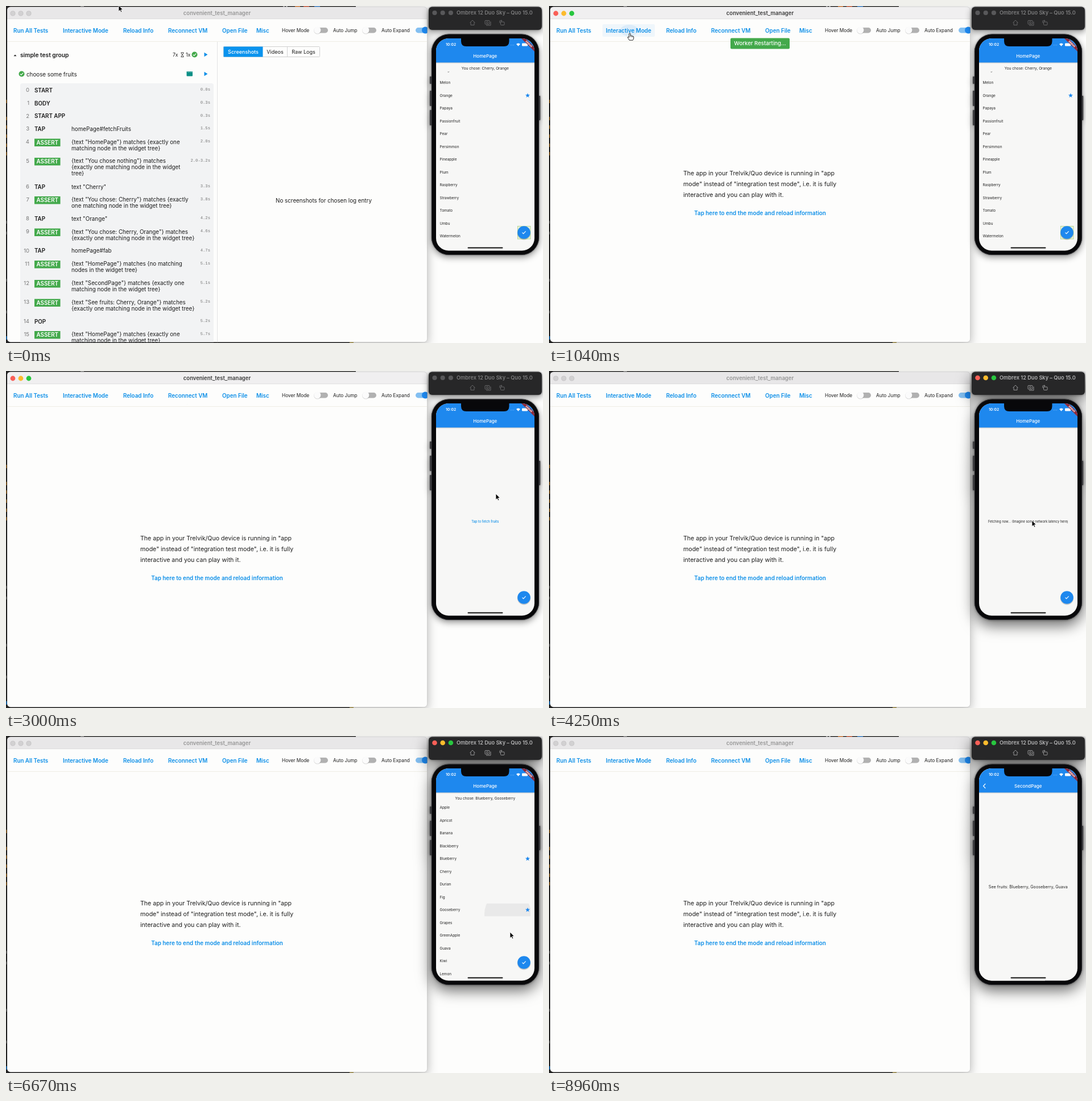
An HTML page for the animation above (9 s loop, 944 by 593 pixels).

```html
<!DOCTYPE html>
<html lang="en">
<head>
<meta charset="utf-8">
<title>convenient_test_manager</title>
<style>
html, body { margin: 0; width: 100%; height: 100%; overflow: hidden; background: #fdfdfc; }
svg { display: block; width: 944px; height: 593px; }
text { font-family: Inter, Roboto, sans-serif; white-space: pre; }
.mono { font-family: "Liberation Mono", "DejaVu Sans Mono", monospace; }
.off { display: none; }
#winFrame { filter: drop-shadow(0 5px 9px rgba(0,0,0,.3)); }
#simShape { filter: drop-shadow(0 0 1.5px rgba(0,0,0,.45)) drop-shadow(0 4px 6px rgba(0,0,0,.42)); }
#simShape.active { filter: drop-shadow(0 0 2px rgba(0,0,0,.5)) drop-shadow(0 9px 13px rgba(0,0,0,.6)); }
</style>
</head>
<body>
<svg id="stage" viewBox="0 0 944 593" xmlns="http://www.w3.org/2000/svg"></svg>
<script>
const BLUE = '#0c8fe8', APP = '#1e88ee', GREEN = '#43a94b', INK = '#1c1c1c', PAPER = '#fdfdfc', PAGE = '#f7f7f6';
const LOOP = 9000, ROW = 22.5;

const esc = s => s.replace(/&/g, '&amp;').replace(/</g, '&lt;');
const text = (x, y, s, size, fill = INK, weight = 400, anchor = 'start', extra = '') =>
  `<text x="${x}" y="${(y + size * .36).toFixed(2)}" font-size="${size}" fill="${fill}" font-weight="${weight}" text-anchor="${anchor}" ${extra}>${esc(s)}</text>`;
const rect = (x, y, w, h, fill, r = 0, extra = '') =>
  `<rect x="${x}" y="${y}" width="${w}" height="${h}" rx="${r}" fill="${fill}" ${extra}/>`;
const dot = (x, y, r, fill, extra = '') => `<circle cx="${x}" cy="${y}" r="${r}" fill="${fill}" ${extra}/>`;
const path = (d, fill = 'none', extra = '') => `<path d="${d}" fill="${fill}" ${extra}/>`;
const group = (id, body, extra = '') => `<g id="${id}" ${extra}>${body}</g>`;
const line = (color, w = 1) => `stroke="${color}" stroke-width="${w}"`;
const check = (x, y, k, color, w) =>
  path(`M${x - 2.6 * k} ${y + .1 * k}L${x - .8 * k} ${y + 1.9 * k}L${x + 2.7 * k} ${y - 1.8 * k}`, 'none', line(color, w));
const passed = (x, y) => dot(x, y, 5, GREEN) + check(x, y, 1, '#fff', 1.2);
const play = (x, y) => path(`M${x - 2.5} ${y - 3.7}V${y + 3.7}L${x + 3.4} ${y}Z`, BLUE);

function lights(x, y, gap, r, colors, edge = 'none') {
  return colors.map((c, i) => dot(x + i * gap, y, r, c, line(edge, .6))).join('');
}

function star(x, y) {
  let d = '';
  for (let i = 0; i < 10; i++) {
    const a = -Math.PI / 2 + i * Math.PI / 5, r = i % 2 ? 1.8 : 4.3;
    d += `${i ? 'L' : 'M'}${(x + r * Math.cos(a)).toFixed(2)} ${(y + r * Math.sin(a)).toFixed(2)}`;
  }
  return path(d + 'Z', APP);
}

// Desktop behind the windows
function desktop() {
  let s = rect(0, 0, 944, 593, PAPER) + rect(0, 0, 615, 8, '#262626') +
    rect(0, 0, 12, 593, '#262626') + rect(0, 585, 606, 8, '#262626');
  for (const y of [168, 198, 213, 229, 245, 260]) s += rect(0, y - 3, 1.5, 6, '#a8742a');
  for (const y of [380, 399, 482, 538]) s += rect(0, y - 2, 1.5, 5, '#666');
  s += rect(0, 581, 2, 6, '#1d6fb5') + rect(131, 0, 6, 1, '#999') + rect(604, 591, 7, 2, '#b9a24c');
  const bits = [[487, 3, '#aaa'], [492, 3, '#aaa'], [508, 9, '#e07a2c'], [523, 10, '#d8502c'], [542, 10, '#3182d8']]
    .map(([x, w, c]) => rect(x, 0, w, 2.5, c)).join('');
  return s + group('topBits', bits);
}

const toggle = x => rect(x, 38, 24, 9.5, '#b1b1b1', 4.7) +
  dot(x + 5.5, 43.2, 6.4, '#00000022') + dot(x + 5.5, 42.5, 6, '#fbfbfb');

function toolbar() {
  const links = [[13, 'Run All Tests'], [100, 'Interactive Mode'], [206, 'Reload Info'], [285, 'Reconnect VM'], [380, 'Open File'], [440, 'Misc']];
  const labels = [[485, 'Hover Mode'], [575, 'Auto Jump'], [660, 'Auto Expand']];
  return group('hover', rect(94, 32, 92, 22, '#eff6fb', 2) + `<ellipse id="press" cx="141" cy="43" rx="14" ry="10" fill="#dcecf9"/>`) +
    links.map(([x, s]) => text(x, 43, s, 9.8, BLUE, 600)).join('') +
    labels.map(([x, s]) => text(x, 43, s, 8.3)).join('') +
    toggle(542) + toggle(627) + rect(720, 38, 24, 9.5, '#83bff1', 4.7) + dot(737, 42.5, 6, APP) +
    rect(2, 62, 738, 1, '#efeee6');
}

const one = '{exactly one';
const LOG = [
  [148, 'START', '', '0.0s'], [171, 'BODY', '', '0.3s'], [193.5, 'START APP', '', '0.3s'],
  [216, 'TAP', 'homePage#fetchFruits', '1.5s'],
  [239, 'ASSERT', `{text "HomePage"} matches ${one}|matching node in the widget tree}`, '2.0s'],
  [272.5, 'ASSERT', `{text "You chose nothing"} matches|${one} matching node in the widget|tree}`, '2.0-3.2s'],
  [318, 'TAP', 'text "Cherry"', '3.3s'],
  [340.5, 'ASSERT', '{text "You chose: Cherry"} matches {exactly|one matching node in the widget tree}', '3.8s'],
  [374, 'TAP', 'text "Orange"', '4.2s'],
  [397, 'ASSERT', `{text "You chose: Cherry, Orange"} matches|${one} matching node in the widget tree}`, '4.6s'],
  [430.5, 'TAP', 'homePage#fab', '4.7s'],
  [453.5, 'ASSERT', '{text "HomePage"} matches {no matching|nodes in the widget tree}', '5.1s'],
  [487.5, 'ASSERT', `{text "SecondPage"} matches ${one}|matching node in the widget tree}`, '5.1s'],
  [521, 'ASSERT', `{text "See fruits: Cherry, Orange"} matches|${one} matching node in the widget tree}`, '5.2s'],
  [555, 'POP', '', '5.2s'],
  [577.5, 'ASSERT', `{text "HomePage"} matches ${one}|matching node in the widget tree}`, '5.7s']
];

function report() {
  let s = rect(371, 63, 1, 530, '#e4e4e4') + path('M13.5 88.3H18.5L16 85.4Z', '#222') +
    text(25, 86, 'simple test group', 10.2, INK, 600) +
    text(293, 86, '7x', 8.6) + text(316, 86, '1x', 8.6) +
    path('M307.5 82H312.5M307.5 89.6H312.5M308.3 82V83.8L311.7 87.8V89.6M311.7 82V83.8L308.3 87.8V89.6', 'none', line('#333', .9)) +
    passed(331.5, 85.5) + play(351, 85.5) +
    passed(27.5, 119.5) + text(36, 120, 'choose some fruits', 9.8) +
    rect(317.5, 115, 10.5, 8.5, '#0b8f86', 1) +
    path('M319.5 115L321 117M322.5 115L324 117M325.5 115L327 117', 'none', line('#fff', .7)) + play(351, 119.5) +
    rect(25, 136, 340, 470, '#f2f3f4', 4);
  LOG.forEach(([y, kind, body, time], i) => {
    s += text(41, y, String(i), 9.5, '#777', 400, 'end');
    s += kind === 'ASSERT'
      ? rect(50, y - 5.5, 45.5, 13.5, GREEN) + text(72.8, y + 1, kind, 9.8, '#fff', 600, 'middle')
      : text(50, y, kind, 9.8, INK, 600);
    if (body) body.split('|').forEach((l, k) => s += text(115, y + k * 11.2, l, 9.8));
    s += text(359, y - 1.3, time, 7.2, '#777', 400, 'end', 'class="mono"');
  });
  return s + rect(382.5, 71.5, 169, 18, PAPER, 1, line('#cfcfcf')) + rect(382.5, 71.5, 69, 18, '#0a93ee') +
    rect(494, 72, 1, 17, '#d4d4d4') + text(417, 81, 'Screenshots', 9, '#fff', 500, 'middle') +
    text(473, 81, 'Videos', 9, INK, 400, 'middle') + text(523, 81, 'Raw Logs', 9, INK, 400, 'middle') +
    text(558.5, 342, 'No screenshots for chosen log entry', 9.8, INK, 400, 'middle');
}

const appMode = () => ['The app in your Trelvik/Quo device is running in "app', 'mode" instead of "integration test mode", i.e. it is fully', 'interactive and you can play with it.']
  .map((s, i) => text(236, 294 + i * 19, s, 10.6)).join('') +
  text(371, 364, 'Tap here to end the mode and reload information', 9.9, BLUE, 600, 'middle');

function manager() {
  const title = (fill) => text(371, 12.5, 'convenient_test_manager', 9.5, fill, 600, 'middle');
  return rect(2, 1.5, 738.5, 590, PAPER, 6, 'id="winFrame"') +
    `<g clip-path="url(#winClip)">` + rect(2, 1.5, 739, 21.5, '#e8e7e8', 0, 'id="bar"') + rect(2, 22.5, 739, .6, '#d6d6d6') +
    group('winIdle', lights(12, 13, 14, 4.1, ['#d2d1d2', '#d2d1d2', '#d2d1d2'], '#b9b8b9') + title('#969696')) +
    group('winActive', lights(12, 13, 14, 4.4, ['#f95f57', '#fcbb2d', '#28c63f']) + title('#3c3c3c')) +
    toolbar() + group('report', report()) + group('appMode', appMode()) +
    group('toast', rect(319, 56.5, 104, 19, GREEN, 2) + text(371, 66, 'Worker Restarting...', 9.6, '#fff', 500, 'middle')) +
    '</g>' + rect(2, 1.5, 738.5, 590, 'none', 6, line('#00000030', .6));
}

const FRUITS = ('Apple Apricot Banana Blackberry Blueberry Cherry Durian Fig Gooseberry Grapes GreenApple Guava Kiwi Lemon ' +
  'Mango Melon Orange Papaya Passionfruit Pear Persimmon Pineapple Plum Raspberry Strawberry Tomato Umbu Watermelon').split(' ');
const listRows = (from, to, top) => FRUITS.slice(from, to).map((s, i) => text(762.5, top + i * ROW, s, 6.4, '#222')).join('');

const simIcons = () => path('M815.5 29.5L820 25L824.5 29.5M817 28.5V33.5H823V28.5', 'none', line('currentColor', .9)) +
  rect(842, 25.5, 8, 6.5, 'none', 1, line('currentColor', .9)) + path('M844 34H852V27.5', 'none', line('currentColor', .9)) +
  dot(846, 28.8, 1.6, 'none', line('currentColor', .8)) +
  rect(869.5, 28, 6.5, 5.5, 'none', 1, line('currentColor', .9)) + path('M868 30V26H872M870.5 24.5L872 26L870.5 27.5', 'none', line('currentColor', .9));

const appBar = title => rect(756, 56, 173.5, 43.5, APP) + rect(756, 99.5, 173.5, 1.2, '#00000026') +
  text(842.3, 88, title, 8, '#fff', 500, 'middle');
const note = (id, y, s, size, fill = '#222', weight = 400) => group(id, text(842.3, y, s, size, fill, weight, 'middle'));

function phone() {
  const shell = rect(743, 1.5, 199, 40.5, '#272728', 6) + rect(748, 49.5, 189, 388.5, '#08080a', 31);
  const buttons = [[745, 124, 13], [745, 149, 27], [745, 183, 27], [936, 158, 43]]
    .map(([x, y, h]) => rect(x, y, 3.2, h, '#3c3c3f', 1)).join('');
  const name = 'Ombrex 12 Duo Sky – Quo 15.0';
  const home = rect(756, 56, 174, 376, PAGE) +
    group('oldList', `<g clip-path="url(#listClip)">${listRows(14, 28, 112.5)}${star(917, 157.5)}</g>` +
      text(842.3, 109.5, 'You chose: Cherry, Orange', 6.5, '#222', 400, 'middle')) +
    note('prompt', 264.5, 'Tap to fetch fruits', 5.7, BLUE, 500) +
    note('fetching', 264.5, 'Fetching now... (Imagine some network latency here)', 5.65) +
    group('newList', `<g clip-path="url(#rowClip)"><circle id="ripple" r="0" fill="#000"/></g>` +
      listRows(0, 14, 126) + [4, 8, 11].map(i => group('star' + i, star(917, 126 + i * ROW))).join('') +
      `<text id="chosen" x="842.3" y="111.8" font-size="6.5" fill="#222" text-anchor="middle"></text>`) +
    appBar('HomePage') +
    group('fabFocus', rect(899.5, 387.5, 22.5, 22.5, '#e9f2dc', 0, line('#a8cf86', .8))) +
    dot(910.5, 399.8, 11.7, '#00000030') + dot(910.5, 398.5, 11.3, APP) + check(910.5, 398.5, 1.15, '#fff', 1.1);
  const second = rect(756, 56, 174, 376, PAGE) + appBar('SecondPage') +
    path('M767.3 84L763.5 88L767.3 92', 'none', line('#fff', 1.1)) +
    text(842.3, 265.5, 'See fruits: Blueberry, Gooseberry, Guava', 7.2, '#222', 400, 'middle');
  const status = text(782, 68, '10:02', 6.8, '#fff', 600, 'middle') +
    path('M800 56H884.5V62Q884.5 71 875.5 71H809Q800 71 800 62Z', '#08080a') +
    [887.5, 890, 892.5].map(x => dot(x, 68.8, .5, '#ffffff99')).join('') +
    path('M897 67Q900.5 63.8 904 67L900.5 70.8Z', '#fff') + rect(907, 65.5, 10, 5, '#fff', 1.3) +
    `<g transform="translate(919.3 66.8) rotate(45)">${rect(-17, -2.5, 34, 5, '#8f2a3a')}${text(0, 0, 'DEBUG', 4.2, '#fff', 800, 'middle')}</g>` +
    rect(811.5, 424.5, 62, 2, '#111', 1);
  return group('simShape', buttons + shell) +
    rect(748.5, 50, 188, 387.5, 'none', 30.5, line('#2c2c30', .8)) +
    group('simIdle', lights(753.5, 12, 14.2, 4.1, ['#58585a', '#58585a', '#58585a']) + text(792, 12, name, 9.2, '#7d7d7e', 600) + simIcons(), 'color="#6d6d6e"') +
    group('simActive', lights(753.5, 12, 14.2, 4.3, ['#f95f57', '#fcbb2d', '#28c63f']) + text(792, 12, name, 9.2, '#b4b4b5', 600) + simIcons(), 'color="#a0a0a1"') +
    `<g clip-path="url(#screenClip)">${group('home', home)}${group('second', second)}${status}</g>`;
}

const cursors = group('arrow', path('M0 0V10.6L2.5 8.3L4.1 11.9L5.8 11.1L4.2 7.6H7.5Z', '#000', line('#fff', .8))) +
  group('hand', path('M-1.2 0.8Q0 -1 1.2 .8V4.2Q2.6 3.4 3.4 4.6Q4.6 4 5.2 5.2Q6.6 4.8 6.8 6.4V9Q6.4 10.8 5.4 12.2H-.8Q-2.2 9.6 -4 7.2Q-3.4 5.6 -1.2 7.2Z', '#fff', line('#111', .9)) +
    path('M1.2 4.2V6.6M3.4 4.8V6.8M5.2 5.4V7', 'none', line('#111', .7)));

const clip = (id, shape) => `<clipPath id="${id}">${shape}</clipPath>`;
document.getElementById('stage').innerHTML = '<defs>' +
  clip('winClip', rect(2, 1.5, 738.5, 590, '#000', 6)) + clip('screenClip', rect(756, 57, 173, 373.5, '#000', 22)) +
  clip('listClip', rect(756, 115.3, 174, 320, '#000')) + clip('rowClip', '<rect id="row" x="756" width="166" height="22.5"/>') +
  '</defs>' + desktop() + manager() + phone() + cursors;

const $ = id => document.getElementById(id);
const show = (id, on) => $(id).classList.toggle('off', !on);
const clamp = v => Math.max(0, Math.min(1, v));
const ease = v => v * v * (3 - 2 * v);

// time, x, y of the pointer tip
const TRACK = [[0, 198, -1], [120, 196, 2], [650, 142, 48], [1400, 142, 48], [2250, 800, 190], [2700, 861, 216], [3150, 861, 216], [3750, 849, 263],
  [4800, 849, 263], [5400, 882, 216], [5750, 882, 216], [6300, 882, 306], [6480, 882, 306], [6670, 886, 345], [6850, 887, 372],
  [7100, 887, 372], [7450, 909, 399], [8050, 909, 399], [8650, 930, -16], [9000, 930, -16]];
// time, list row, horizontal touch point
const TAPS = [[5580, 4, 882], [6400, 8, 882], [6980, 11, 887]];

function pointer(t) {
  const i = TRACK.findIndex(k => k[0] > t), a = TRACK[i - 1], b = TRACK[i];
  const p = ease((t - a[0]) / (b[0] - a[0]));
  return [a[1] + (b[1] - a[1]) * p, a[2] + (b[2] - a[2]) * p];
}

function drawRipple(t) {
  const tap = TAPS.filter(k => k[0] <= t).pop();
  const age = tap ? t - tap[0] : LOOP;
  show('ripple', age < 450);
  if (age >= 450) return;
  const y = 126 + tap[1] * ROW, r = $('ripple');
  $('row').setAttribute('y', y - 11.2);
  r.setAttribute('cx', tap[2]);
  r.setAttribute('cy', y + 7);
  r.setAttribute('r', 8 + age * .122);
  r.setAttribute('opacity', .055 * clamp((450 - age) / 150));
}

function draw(t) {
  const winOn = t >= 680 && t < 3850, simOn = t >= 3850;
  const mode = t >= 900, fresh = t >= 1950, listed = t >= 5000;
  show('winIdle', !winOn); show('winActive', winOn);
  $('bar').setAttribute('fill', winOn ? '#f0eff0' : '#e8e7e8');
  show('simIdle', !simOn); show('simActive', simOn);
  $('simShape').classList.toggle('active', simOn);
  show('report', !mode); show('appMode', mode);
  show('toast', t >= 800 && t < 1850);
  show('topBits', t < 2000 || t >= 8500);

  show('hover', t >= 560 && t < 1500);
  const press = clamp((t - 680) / 300);
  $('press').setAttribute('rx', 4 + press * 12);
  $('press').setAttribute('opacity', press ? clamp((1300 - t) / 250) : 0);

  show('oldList', !fresh); show('fabFocus', !fresh);
  show('prompt', fresh && t < 3950); show('fetching', t >= 3950 && !listed);
  show('newList', listed);
  const picked = TAPS.filter(k => t >= k[0] + 90).map(k => k[1]);
  for (const [, i] of TAPS) show('star' + i, picked.includes(i));
  $('chosen').textContent = 'You chose: ' + (picked.map(i => FRUITS[i]).join(', ') || 'nothing');
  drawRipple(t);

  const slide = 1 - Math.pow(1 - clamp((t - 7520) / 380), 3);
  $('home').setAttribute('transform', `translate(${-58 * slide} 0)`);
  $('second').setAttribute('transform', `translate(${174 * (1 - slide)} 0)`);
  show('second', slide > 0);

  const hand = t >= 560 && t < 1500, [x, y] = pointer(t);
  show('hand', hand); show('arrow', !hand);
  $(hand ? 'hand' : 'arrow').setAttribute('transform', `translate(${x.toFixed(1)} ${y.toFixed(1)})`);
}

function tick() {
  draw(performance.now() % LOOP);
  requestAnimationFrame(tick);
}
tick();
</script>
</body>
</html>
```
